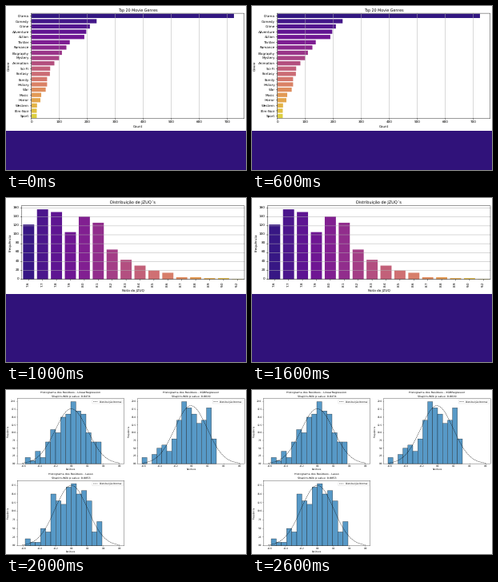
Write a matplotlib script that moves like this. It is 300x205 px and loops after 3 s.

```python
import colorsys

import matplotlib.pyplot as plt
import numpy as np
from matplotlib.animation import ArtistAnimation
from matplotlib.patches import Rectangle

W, H, DPI = 300, 205, 80
PT = 72 / DPI  # points per pixel
PURPLE = "#30127a"
BLUE = "#5799c7"

plt.rcParams.update({"font.family": "DejaVu Sans", "text.hinting": "none"})
fig = plt.figure(figsize=(W / DPI, H / DPI), dpi=DPI, facecolor="white")
ax = fig.add_axes([0, 0, 1, 1])
ax.set_xlim(0, W)
ax.set_ylim(H, 0)
ax.axis("off")


def rect(x, y, w, h, color, edge="none", lw=0.0, z=1):
    return ax.add_patch(Rectangle((x, y), w, h, facecolor=color, edgecolor=edge,
                                  linewidth=lw * PT, zorder=z, snap=False))


def line(xs, ys, color="black", lw=0.4, z=3, **style):
    return ax.plot(xs, ys, color=color, lw=lw * PT, zorder=z, snap=False, **style)[0]


def text(x, y, s, size, ha="center", va="center", rot=0):
    return ax.text(x, y, s, fontsize=size * PT, ha=ha, va=va, rotation=rot, zorder=5)


def frame(left, top, right, bottom, lw=0.4):
    return line([left, right, right, left, left],
                [top, top, bottom, bottom, top], lw=lw)


def palette(n):
    """Evenly spaced plasma colours at three quarters of their saturation."""
    colors = []
    for r, g, b, _ in plt.get_cmap("plasma")(np.linspace(0, 1, n + 2)[1:-1]):
        h, l, s = colorsys.rgb_to_hls(r, g, b)
        colors.append(colorsys.hls_to_rgb(h, l, 0.75 * s))
    return colors


def grid_line(xs, ys):
    return line(xs, ys, color="#b0b0b0", lw=0.6, z=2, alpha=0.8)


def genre_chart():
    genres = {"Drama": 724, "Comedy": 233, "Crime": 209, "Adventure": 196,
              "Action": 189, "Thriller": 137, "Romance": 125, "Biography": 109,
              "Mystery": 99, "Animation": 82, "Sci-Fi": 67, "Fantasy": 66,
              "Family": 56, "History": 56, "War": 51, "Music": 35, "Horror": 32,
              "Western": 20, "Film-Noir": 19, "Sport": 19}
    left, top, right, bottom = 31.8, 9.1, 297.6, 140.8
    step = (bottom - top) / len(genres)
    scale = (right - left) / (724 * 1.05)
    art = [rect(0, 156, W, H - 156, PURPLE), frame(left, top, right, bottom)]
    for i, ((name, n), color) in enumerate(zip(genres.items(), palette(20))):
        y = top + (i + 0.5) * step
        art += [rect(left, y - 0.4 * step, n * scale, 0.8 * step, color),
                line([left - 1.4, left], [y, y]),
                text(28.8, y, name, 4.1, ha="right", va="center_baseline")]
    for v in range(0, 800, 100):
        x = left + v * scale
        art += [grid_line([x, x], [top, bottom]),
                line([x, x], [bottom, bottom + 1.4]),
                text(x, 145.8, str(v), 4.1)]
    art += [text(164.5, 5.2, "Top 20 Movie Genres", 4.8),
            text(164.5, 151.5, "Count", 4.1),
            text(5, 75, "Genre", 4.1, rot=90)]
    return art


def rating_chart():
    counts = [123, 157, 151, 106, 141, 127, 67, 44, 31, 20, 15, 5, 5, 3, 3, 1]
    ratings = [7.6 + 0.1 * i for i in range(15)] + [9.2]
    left, top, right, bottom = 19.6, 9.8, 298, 101.8
    step = (right - left) / len(counts)
    scale = (bottom - top) / (157 * 1.05)
    art = [rect(0, 120, W, H - 120, PURPLE), frame(left, top, right, bottom)]
    for i, (n, rating, color) in enumerate(zip(counts, ratings, palette(16))):
        x = left + (i + 0.5) * step
        art += [rect(x - 0.4 * step, bottom - n * scale, 0.8 * step, n * scale, color),
                line([x, x], [bottom, bottom + 1.4]),
                text(x, 107.8, f"{rating:.1f}", 4.2, rot=90)]
    for v in range(0, 180, 20):
        y = bottom - v * scale
        art += [grid_line([left, right], [y, y]),
                line([left - 1.4, left], [y, y]),
                text(16.8, y, str(v), 4.2, ha="right")]
    art += [text(158.8, 5.3, "Distribuição de JZUQ´s", 5.05),
            text(158.8, 114.9, "Nota do JZUQ", 4.2),
            text(6, 56, "Frequência", 4.2, rot=90)]
    return art


def residual_panel(left, top, model, p, counts, start, end, mean, sigma, peak):
    right, bottom = left + 133.6, top + 81.4
    zero = left + 67.7
    scale = (bottom - top) / (max(counts) * 1.05)
    width = (end - start) / len(counts)
    art = [frame(left, top, right, bottom, 0.3)]
    for i, n in enumerate(counts):
        if n:
            art.append(rect(start + i * width, bottom - n * scale, width, n * scale,
                            BLUE, "black", 0.28))

    xs = np.linspace(left + 6.1, right - 6.1, 100)
    ys = bottom - peak * scale * np.exp(-0.5 * ((xs - mean) / sigma) ** 2)
    dashes = {"dashes": (3.7, 1.6)}
    art.append(line(xs, ys, lw=0.42, **dashes))

    for k in range(-3, 4):
        x = zero + 20 * k
        label = f"{0.2 * k:.1f}".replace("-", "\u2212")
        art += [line([x, x], [bottom, bottom + 0.9], lw=0.25),
                text(x, bottom + 3.2, label, 2.75)]
    for v in np.arange(0, max(counts) + 0.1, 2.5):
        y = bottom - v * scale
        art += [line([left - 0.9, left], [y, y], lw=0.25),
                text(left - 1.8, y, f"{v:.1f}", 2.75, ha="right")]

    art += [rect(right - 39.9, top + 1.3, 38.6, 5, "white", "#cccccc", 0.3, z=4),
            line([right - 38.8, right - 33.3], [top + 3.8] * 2, lw=0.42, z=5, **dashes),
            text(right - 31.2, top + 3.8, "Distribuição Normal", 2.8, ha="left")]
    middle = (left + right) / 2
    art += [text(middle, top - 7.5, f"Histograma dos Resíduos - {model}", 3.33),
            text(middle, top - 3.2, f"Shapiro-Wilk p-value: {p}", 3.33),
            text(middle, bottom + 7.4, "Resíduos", 2.75),
            text(left - 10.8, (top + bottom) / 2, "Frequência", 2.75, rot=90)]
    return art


def residual_charts():
    linear = [2, 1, 4, 2, 7, 11, 10, 15, 16, 20, 17, 16, 10, 7, 7]
    boosted = [2, 0, 3, 5, 6, 4, 8, 14, 20, 18, 16, 13, 14, 18, 8]
    lasso = [2, 1, 1, 5, 4, 15, 13, 12, 17, 18, 15, 16, 13, 4, 7]
    return (residual_panel(14.2, 10.7, "LinearRegression", "0.0474", linear,
                           24, 119, 81.7, 20.5, 17.7)
            + residual_panel(164.6, 10.7, "XGBRegressor", "0.0019", boosted,
                             170, 263, 231.2, 20.3, 18.7)
            + residual_panel(14.2, 113.2, "Lasso", "0.0853", lasso,
                             24, 120, 81.7, 20.5, 17.5))


scenes = [genre_chart(), rating_chart(), residual_charts()]
anim = ArtistAnimation(fig, scenes, interval=1000, repeat=True, repeat_delay=0)
plt.show()
```
